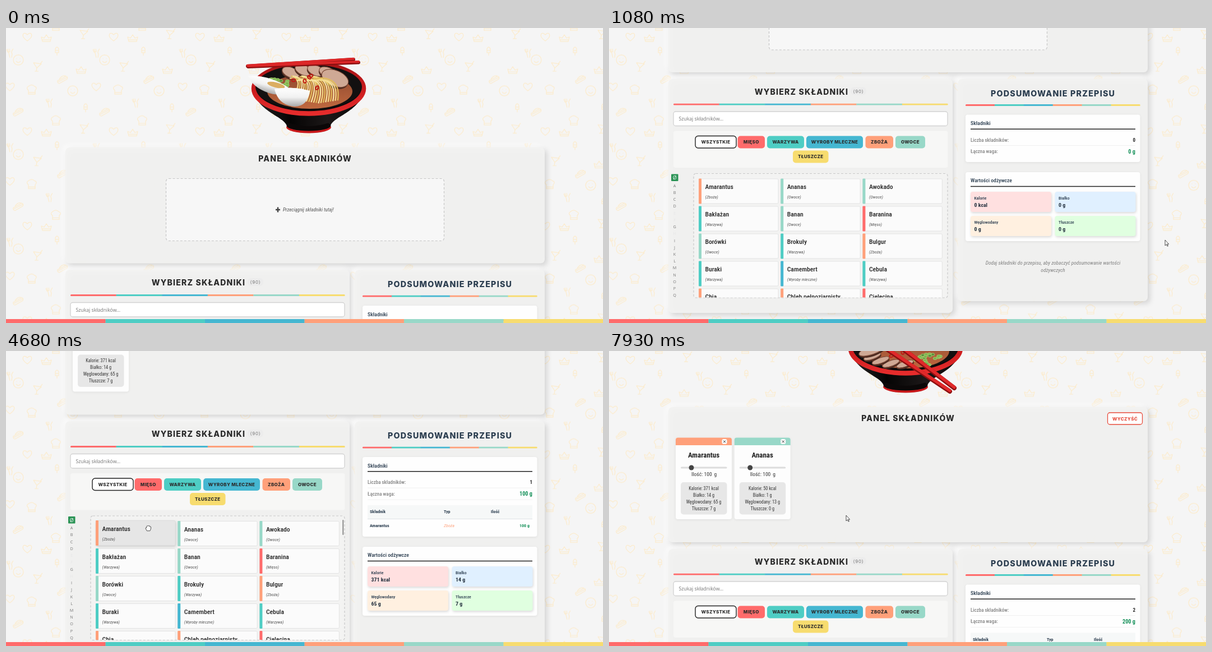
Write an HTML page that moves like this. It is 1065 by 526 pixels and loops after 8 s.

```html
<!DOCTYPE html>
<html lang="pl">
<head>
<meta charset="utf-8">
<title>Panel składników</title>
<style>
  html, body { margin: 0; width: 100%; height: 100%; overflow: hidden; background: #f5f5f5; }
  svg { display: block; width: 100%; height: 100%; --tight: 0; }
  text { font-family: "Roboto Condensed", Roboto, sans-serif; font-stretch: 75%; letter-spacing: var(--tight); white-space: pre; }
  .m { font-weight: 500; }
  .b { font-weight: 700; }
  .i { font-style: italic; }
  .wide, .btn { font-family: Inter, sans-serif; font-stretch: 100%; font-weight: 800; letter-spacing: 1.2px; }
  .btn { letter-spacing: .35px; }
  .count { font-family: Inter, sans-serif; font-stretch: 100%; letter-spacing: .8px; }
  .ui { font-family: "Open Sans", "Noto Sans", sans-serif; font-stretch: 100%; letter-spacing: 0; }
  .panel { filter: drop-shadow(4px 4px 5px #00000026) drop-shadow(-4px -4px 5px #ffffffb0); }
  .card { filter: drop-shadow(0 1px 2px #00000012); }
  .lift { filter: drop-shadow(1px 2px 2px #00000026); }
</style>
</head>
<body>
<svg id="stage" viewBox="0 0 1065 526" preserveAspectRatio="none" xmlns="http://www.w3.org/2000/svg"></svg>
<script>
const W = 1065, H = 526, LOOP = 8000, STEP = 67.6, GROWTH = 34.5, FOLD = 340.5;
const svg = document.getElementById('stage');

const COLOR = {
  'Mięso': '#ff6b6b', 'Warzywa': '#4ecdc4', 'Wyroby mleczne': '#45b7d1',
  'Zboża': '#ffa07a', 'Owoce': '#98d8c8', 'Tłuszcze': '#f7dc6f'
};
const BAND = Object.values(COLOR);
const FOODS = [
  ['Amarantus', 'Zboża'], ['Ananas', 'Owoce'], ['Awokado', 'Owoce'],
  ['Bakłażan', 'Warzywa'], ['Banan', 'Owoce'], ['Baranina', 'Mięso'],
  ['Borówki', 'Owoce'], ['Brokuły', 'Warzywa'], ['Bulgur', 'Zboża'],
  ['Buraki', 'Warzywa'], ['Camembert', 'Wyroby mleczne'], ['Cebula', 'Warzywa'],
  ['Chia', 'Zboża'], ['Chleb pełnoziarnisty', 'Zboża'], ['Cielęcina', 'Mięso']
];
const NUTRIENTS = ['Kalorie', 'Białko', 'Węglowodany', 'Tłuszcze'];
const UNITS = ['kcal', 'g', 'g', 'g'];
const CHOSEN = [
  { name: 'Amarantus', type: 'Zboża', values: [371, 14, 65, 7] },
  { name: 'Ananas', type: 'Owoce', values: [50, 1, 13, 0] }
];

// ---- helpers ----
const clamp = (v, a = 0, b = 1) => Math.min(b, Math.max(a, v));
const ease = u => u * u * (3 - 2 * u);
const ramp = (t, a, b) => ease(clamp((t - a) / (b - a)));
const rect = (x, y, w, h, fill, r = 0, more = '') =>
  `<rect x="${x}" y="${y}" width="${w}" height="${h}" rx="${r}" fill="${fill}" ${more}/>`;
const text = (x, y, str, size, fill, cls = '', anchor = 'start') =>
  `<text x="${x}" y="${y}" font-size="${size}" fill="${fill}" class="${cls}" text-anchor="${anchor}">${str}</text>`;
const oval = (x, y, rx, ry, fill, more = '') =>
  `<ellipse cx="${x}" cy="${y}" rx="${rx}" ry="${ry}" fill="${fill}" ${more}/>`;
const line = (x1, y, x2, color, w) =>
  `<path d="M${x1},${y}H${x2}" stroke="${color}" stroke-width="${w}"/>`;
const stripes = (x, y, w, h, clip = '') => `<g ${clip}>` +
  BAND.map((color, i) => rect(x + i * w / 6, y, w / 6 + .3, h, color)).join('') + '</g>';
const panel = (x, y, w, h) => rect(x, y, w, h, '#f2f2f1', 7, 'fill-opacity=".94" class="panel"');

// ---- wallpaper ----
const ICONS = {
  heart: ['M0,7C-14,-3 -6,-11 0,-4C6,-11 14,-3 0,7Z', [38, 16], [7, 105]],
  smile: ['M-9,0a9,9 0 1 0 18,0a9,9 0 1 0 -18,0M-4,2q4,5 8,0M-3,-3v1M3,-3v1', [22, 57], [119, 112]],
  fork: ['M-5,-8L-3,0L-1,8M-7,-7L-5,-2L-1,-3L-2,-8M5,-8Q0,-2 3,1L2,8', [78, 134], [8, 45]],
  bun: ['M-9,2L6,-6Q10,-5 8,-1L-6,7Q-10,6 -9,2ZM-8,4L8,-4M-6,-1Q0,-9 6,-6', [22, 150], [101, 92]],
  hat: ['M-6,8V1Q-11,-3 -6,-6Q0,-11 5,-6Q11,-4 6,1V8ZM-6,5H6', [46, 110], [89, 165]],
  pot: ['M-7,6L-9,-2L-4,0L0,-6L4,0L9,-2L7,6ZM-7,3H7', [72, 18], [134, 75]],
  glass: ['M-8,-6L6,-4L-2,3ZM-2,3L-3,9M-6,9H1M4,-4L8,-9', [140, 10], [57, 68]],
  bottle: ['M-3,-4V3H3V-4Q0,-10 -3,-4ZM0,3V8M-3,-1H3', [91, 41], [142, 142]]
};
const TILE = [154, 168.5];
const wallpaper = Object.values(ICONS).map(([d, ...spots]) => spots.map(([x, y]) =>
  [0, TILE[0]].map(dx => [0, -TILE[1]].map(dy =>
    `<path d="${d}" transform="translate(${x + dx},${y + dy})"/>`).join('')).join('')).join('')).join('');

// ---- page parts ----
const heading = (x, y, str, fill = '#2b2b2b', size = 14) => text(x + .6, y, str, size, fill, 'wide', 'middle');

function board(n) {
  let out = panel(106, 213, 855, 206.5 + (n ? GROWTH : 0)) + heading(533, 238, 'PANEL SKŁADNIKÓW');
  if (!n) return out +
    rect(285.5, 268.5, 496, 111, '#ffffff80', 5, 'stroke="#c6c6c6" stroke-width="1.2" stroke-dasharray="4 3"') +
    '<path d="M481,324h8M485,319.5v9" stroke="#444" stroke-width="2.4"/>' +
    text(494, 327, 'Przeciągnij składniki tutaj!', 9, '#555', 'i');
  out += rect(889.5, 223, 62, 21, '#fff', 4, 'stroke="#e74c3c" stroke-width="1.3"') +
    text(920.5, 236.5, 'WYCZYŚĆ', 8, '#e74c3c', 'btn', 'middle');
  return out + CHOSEN.slice(0, n).map((c, i) => `<g transform="translate(${119 + i * 104.7},267.5)">` +
    rect(0, 0, 100, 145.5, '#fdfdfd', 4, 'class="card"') +
    `<path d="M0,13.5V4Q0,0 4,0H96Q100,0 100,4V13.5Z" fill="${COLOR[c.type]}"/>` +
    rect(82.5, 2.5, 9, 9, '#fff', 3) +
    '<path d="M85,5l4,4M89,5l-4,4" stroke="#333" stroke-width="1"/>' +
    text(50, 35.5, c.name, 13, '#222', 'b', 'middle') +
    rect(9, 52, 82.5, 3, '#dcdcdc', 1.5) + oval(28, 53.5, 4.5, 4.5, '#444') +
    text(28, 68, 'Ilość:', 9.5, '#333') + text(50.5, 68, '100', 9.5, '#333') + text(68.5, 68, 'g', 9.5, '#333') +
    rect(9, 79.5, 82.5, 57.5, '#e7e7e7', 5) +
    NUTRIENTS.map((label, k) =>
      text(50, 93.3 + k * 11.9, `${label}: ${c.values[k]} ${UNITS[k]}`, 8.2, '#333', '', 'middle')).join('') +
    '</g>').join('');
}

function filters() {
  const row = [['MIĘSO', 229.5, 48.5], ['WARZYWA', 282, 66], ['WYROBY MLECZNE', 352, 101],
    ['ZBOŻA', 457.5, 49.5], ['OWOCE', 511, 53], ['TŁUSZCZE', 328, 63.5]];
  return rect(115, 524, 489.5, 65.5, '#ffffff70', 4) +
    rect(154, 533, 73, 21.5, '#fff', 5, 'stroke="#222" stroke-width="1.4"') +
    text(190.5, 546.8, 'WSZYSTKIE', 8, '#2b2b2b', 'btn', 'middle') +
    row.map(([label, x, w], i) => rect(x, i < 5 ? 533 : 559, w, 22, BAND[i], 5) +
      text(x + w / 2, i < 5 ? 546.8 : 572.8, label, 8, '#2b2b2b', 'btn', 'middle')).join('');
}

function picker(hover, bar) {
  const cards = FOODS.map(([name, type], i) => {
    const on = i === hover;
    return `<g transform="translate(${160 + i % 3 * 146.2},${609.5 + Math.floor(i / 3) * 49 - (on ? 1 : 0)})">` +
      rect(.5, 0, 141.5, 44, on ? '#e6e6e6' : '#fbfbfb', 2,
        `stroke="${on ? '#dcdcdc' : '#e3e3e3'}" stroke-width="1" class="${on ? 'lift' : ''}"`) +
      rect(0, -.5, 5, 45, COLOR[type], 1) +
      text(11.5, 18.3, name, 11.7, '#262626', 'm') +
      text(11.5, 35.3, `(${type})`, 7.8, '#555', 'i') + '</g>';
  }).join('');
  const letters = [...'ABCDEFGHIJKLMNOPQ'].map((ch, i) =>
    text(117, 624.2 + i * 12.23, ch, 7.2, 'EFH'.includes(ch) ? '#e6e6e6' : '#777', 'ui', 'middle')).join('');
  return panel(106, 431.5, 507, 417) +
    heading(343, 459, 'WYBIERZ SKŁADNIKI') +
    rect(431, 446, 28, 14, '#ececec', 6) + text(445, 456.3, '(90)', 8, '#777', 'count', 'middle') +
    stripes(115, 475, 489.5, 3.2, 'clip-path="inset(0 round 1.5px)"') +
    rect(115, 489.5, 489, 25.5, '#fff', 4, 'stroke="#d2d2d2" stroke-width="1.3"') +
    text(124.5, 505.6, 'Szukaj składników...', 8.7, '#757575', 'ui') + filters() +
    rect(151, 600, 453, 221.5, '#ffffff30', 4, 'stroke="#c9c9c9" stroke-width="1.2" stroke-dasharray="4 3"') +
    `<g clip-path="url(#list)">${cards}${letters}</g>` +
    rect(111, 601, 12.5, 12.5, '#2a9355', 1) + text(117.2, 610.7, 'Ø', 9, '#fff', 'ui', 'middle') +
    (bar ? rect(600.5, 607, 1.6, 27, '#777', .8) : '');
}

function summary(n) {
  const items = CHOSEN.slice(0, n);
  const extra = n ? 33.5 + 24 * n : 0;
  const totals = NUTRIENTS.map((_, k) => items.reduce((sum, c) => sum + c.values[k], 0));
  const INK = '#2c3e50', GREEN = '#16915a';
  let out = panel(622.5, 431.5, 338.5, 396 + (n ? 60 : 0)) +
    heading(791.5, 462, 'PODSUMOWANIE PRZEPISU', INK, 14.3) +
    stripes(636, 476.5, 311.5, 3.2, 'clip-path="inset(0 round 1.5px)"') +
    rect(636, 495, 311.5, 84.5 + extra, '#fefefe', 4, 'class="card"') +
    text(645, 513.7, 'Składniki', 9.7, INK, 'm') + line(645, 520.7, 939, '#222', 1.5) +
    text(645, 543, 'Liczba składników:', 9, '#858585', 'm') +
    text(939, 543, n, 9, '#222', 'b', 'end') + line(645, 550, 939, '#f0f0f0', 1) +
    text(645, 563.7, 'Łączna waga:', 9, '#858585', 'm') +
    text(939, 564, `${n * 100} g`, 10.2, GREEN, 'b', 'end');
  if (n) {
    out += line(645, 571, 939, '#f2f2f2', 1) + rect(645, 581, 294, 24.5, '#f6f8f8') +
      [['Składnik', 649], ['Typ', 781], ['Ilość', 865]].map(([s, x]) => text(x, 595.2, s, 8, INK, 'b')).join('') +
      line(645, 605.5, 939, '#dfe3e6', 1);
    items.forEach((c, i) => {
      const y = 619.5 + i * 24;
      out += text(649, y, c.name, 8, INK, 'b') + text(781, y, c.type, 8, COLOR[c.type], 'i') +
        text(934, y, '100 g', 8, GREEN, 'b', 'end') + (i < n - 1 ? line(645, y + 10, 939, '#f0f0f0', 1) : '');
    });
  }
  const y = 597.5 + extra;
  out += rect(636, y, 311.5, 123, '#fefefe', 4, 'class="card"') +
    text(645, y + 18.2, 'Wartości odżywcze', 9.7, INK, 'm') + line(645, y + 25.5, 939, '#222', 1.5);
  ['#ffe0e0', '#e0f0ff', '#fff0e0', '#e0ffe0'].forEach((fill, k) => {
    const x = 645 + k % 2 * 150.5, ty = y + 35 + (k > 1 ? 43 : 0);
    out += rect(x, ty, 144, 36, fill, 4, 'class="lift"') +
      text(x + 6.5, ty + 13.5, NUTRIENTS[k], 7.8, INK, 'm') +
      text(x + 6.5, ty + 27, `${totals[k]} ${UNITS[k]}`, 9.9, '#222f3d', 'b');
  });
  if (!n) out += ['Dodaj składniki do przepisu, aby zobaczyć podsumowanie wartości', 'odżywczych']
    .map((s, i) => text(792, 762 + i * 13.3, s, 9.4, '#808080', 'i', 'middle')).join('');
  return out;
}

// ---- turning bowl ----
function bowl(t) {
  const late = t > 4000, cx = late ? 529 : 540;
  const turn = late ? 2.65 + (t - 7910) * .0006 : t * .00065;
  const c = Math.cos(turn), s = Math.sin(turn);
  const at = (x, z, h = 0) => [cx + x * c + z * s, 112 + .43 * (z * c - x * s) - h].map(v => +v.toFixed(1));
  let out = `<g transform="translate(${cx},0)">
    <path d="M-101,106C-92,150 -46,156 -39,174Q0,188 39,174C46,156 92,150 101,106Z" fill="url(#black)"/>` +
    oval(0, 177, 40, 10.5, '#c9191b') + oval(0, 174, 39.5, 9.5, '#0b0808') +
    '<path d="M-39,168C-44,152 -92,148 -100,108Q0,180 100,108C92,148 44,152 39,168Q0,182 -39,168Z" fill="url(#black)"/>' +
    oval(0, 108, 98, 44.5, '#0d0a0a', 'stroke="url(#red)" stroke-width="8.5"') +
    oval(0, 105, 95, 40, '#131010') + oval(2, 113, 76, 31, 'url(#soup)') + '</g>';

  // slices lean away from the front, so they look thin once turned round
  const lean = .43 + .13 * c;
  [[-32, -62], [-9, -72], [13, -70], [34, -62], [47, -38]].forEach(([x, z], i) => {
    const [px, py] = at(x, z, 6), r = i === 4 ? 25 : 16;
    out += `<g transform="translate(${px},${py}) rotate(${(22 * c).toFixed(1)})">` +
      oval(0, 2.5, r, r * (lean + .04), '#4d2b20') +
      oval(0, 0, r, r * lean, '#cfa995', 'stroke="#7d4c3a" stroke-width="1.2"') + '</g>';
  });
  for (let i = 0; i < 26; i++) {
    const [x, y] = at(-54 + Math.sin(i * 5.1) * 16, -20 + Math.cos(i * 3.7) * 22, 3);
    out += oval(x, y, 3.4, 2.3, i % 3 ? '#7cb54c' : '#5a8f3c', 'stroke="#a9cf72" stroke-width=".9"');
  }
  if (!late) {
    for (let i = 0; i < 20; i++) {
      const a = at(-34 + i * 2.6, -38 - Math.sin(i) * 10, 6);
      const m = at(-6 + i * 3.4, -20, 16), e = at(-30 + i * 4.3, 52 - Math.abs(i - 11) * 1.5);
      out += `<path d="M${a}Q${m} ${e}" fill="none" stroke="${['#f3d986', '#e2bc5c', '#f8e5a4'][i % 3]}" stroke-width="2.3"/>`;
    }
  }
  [[-27, -28], [1, -40], [-7, -24], [15, 4], [4, -46]].forEach(([x, z], i) => {
    const [px, py] = at(x, z, 7);
    out += oval(px, py, 3.4, 2.4, 'none', `stroke="#c01d16" stroke-width="2" transform="rotate(${i * 40} ${px} ${py})"`);
  });
  if (late) {
    const dx = (t - 7910) * .02;
    return out + `<g transform="translate(${dx.toFixed(2)},0)" fill="none" stroke-linecap="round">
      <path d="M478,98L608,185M512,100L616,179" stroke="#8d0f10" stroke-width="8"/>
      <path d="M478,96.5L608,183.5M512,98.5L616,177.5" stroke="#e0292a" stroke-width="5.5"/></g>`;
  }
  const egg1 = at(-73, -16, 6), egg2 = at(-30, 42, 8);
  out += `<g transform="translate(${egg1}) rotate(14)">
    <path d="M-37,-5Q0,-16 37,-2Q30,18 6,16Q-26,13 -37,-5Z" fill="url(#egg)"/>` + oval(15, -1, 16, 4.6 * c, '#dcae62') +
    `</g><g transform="translate(${egg2})">
    <path d="M-31,-13Q0,-19 32,-10Q28,18 5,18Q-24,16 -31,-13Z" fill="url(#egg)"/>
    <path d="M-31,-13Q0,-19 32,-10Q0,-8 -31,-13Z" fill="#fafafa"/></g>`;
  return out + `<g transform="rotate(${(-turn * 20).toFixed(2)} 530 63)" fill="none" stroke-linecap="round">
    <path d="M431,68L620,56M432,69L629,61.5" stroke="#8d0f10" stroke-width="6"/>
    <path d="M431,66.8L620,54.8M432,67.8L629,60" stroke="#dc2728" stroke-width="4"/></g>`;
}

// ---- pointer ----
const PATH = [
  [60, 1008, 505], [640, 992, 378], [1350, 992, 378], [1650, 800, 424], [1900, 642, 300],
  [2160, 780, 176], [2360, 966, 125], [2640, 870, 405], [3000, 580, 400],
  [3740, 251, 303], [4450, 251, 303], [4850, 256, 326], [4930, 256, 326], [5200, 399, 328],
  [5960, 399, 328], [6280, 650, 432], [6560, 928, 390], [6760, 800, 180],
  [7100, 880, 430], [7420, 985, 393], [7540, 985, 393], [7905, 423, 293]
];
function pointer(t) {
  const i = PATH.findIndex(p => p[0] > t);
  if (i === 0) return null;
  if (i < 0) return PATH[PATH.length - 1].slice(1);
  const [a, b] = [PATH[i - 1], PATH[i]], u = ramp(t, a[0], b[0]);
  return [a[1] + (b[1] - a[1]) * u, a[2] + (b[2] - a[2]) * u];
}
const ARROW = 'M0,0V10L2.4,7.8L4,11.2L5.4,10.6L3.9,7.3H6.6Z';
const HAND = 'M-2.5,5L-4.8,.6Q-4.6,-1.4 -3,-.4V-3Q-2,-5 -1,-3.4Q0,-5.6 1,-3.4Q2.6,-5 3,-2.6Q4.8,-3.2 4.8,-.8Q4.8,2 3,5Z';

function cardUnder(x, y) {
  const u = x - 160, v = y - 609.5, col = Math.floor(u / 146.2), row = Math.floor(v / 49);
  const inside = col >= 0 && col < 3 && row >= 0 && row < 5 && y < 821 && u - col * 146.2 < 142 && v - row * 49 < 45;
  return inside ? row * 3 + col : -1;
}

// ---- stage ----
const grad = (id, stops, dir = 'x2="0" y2="1"') => `<linearGradient id="${id}" ${dir}>` +
  stops.map((c, i) => `<stop offset="${i / (stops.length - 1)}" stop-color="${c}"/>`).join('') + '</linearGradient>';
svg.innerHTML = `<defs>
  <pattern id="wall" width="${TILE[0]}" height="${TILE[1]}" patternUnits="userSpaceOnUse">
    <g fill="none" stroke="#fcebcb" stroke-width="1.2" stroke-linejoin="round">${wallpaper}</g></pattern>
  <clipPath id="list"><rect x="106" y="601" width="498" height="220"/></clipPath>
  ${grad('black', ['#2a2626', '#050404', '#1c1818', '#060505'], '')}
  ${grad('red', ['#a51517', '#c91b1d', '#e62c2c'])}
  ${grad('soup', ['#8f4a30', '#c0683f'])}
  ${grad('egg', ['#ffffff', '#f1f1f1', '#a9a9a9'])}</defs>` +
  rect(0, 0, W, H, '#f5f5f5') + rect(0, 0, W, H, 'url(#wall)') +
  '<g id="page"><g id="bowl"></g><g id="board"></g><g id="lower"></g></g>' +
  stripes(0, 519, W, 7) +
  '<path id="cursor" stroke="#222" stroke-width=".8" fill="#fff" stroke-linejoin="round"/><text id="probe" visibility="hidden" font-size="40">Składniki</text>';
const [page, bowlG, boardG, lower, cursor, probe] =
  ['page', 'bowl', 'board', 'lower', 'cursor', 'probe'].map(id => document.getElementById(id));

// tighter tracking when no condensed face is available
const narrow = probe.getComputedTextLength();
probe.style.cssText = 'font-family:Roboto,sans-serif;font-stretch:100%';
if (narrow > probe.getComputedTextLength() * .96) svg.style.setProperty('--tight', '-.06em');
probe.remove();

let shown = '';
function draw(t) {
  const n = t < 4420 ? 0 : t < 5740 ? 1 : 2;
  const scroll = FOLD * (ramp(t, 645, 1075) - ramp(t, 7464, 8189));
  const shift = n ? GROWTH : 0;
  const pos = pointer(t);
  const hover = pos ? cardUnder(pos[0], pos[1] + scroll - shift) : -1;
  const bar = t > 3060;
  const key = [n, hover, bar].join();
  if (key !== shown) {
    shown = key;
    boardG.innerHTML = board(n);
    lower.innerHTML = picker(hover, bar) + summary(n);
    lower.setAttribute('transform', `translate(0,${shift})`);
  }
  page.setAttribute('transform', `translate(0,${(-scroll).toFixed(2)})`);
  bowlG.innerHTML = scroll < 195 ? bowl(t) : '';
  cursor.style.display = pos ? '' : 'none';
  if (pos) {
    const grab = (t >= 4140 && t < 4420) || (t >= 5470 && t < 5740);
    cursor.setAttribute('d', hover < 0 ? ARROW : HAND);
    cursor.setAttribute('transform', `translate(${pos[0].toFixed(1)},${pos[1].toFixed(1)}) scale(${grab ? .85 : 1})`);
  }
}

// the picture advances about fifteen times a second
const start = performance.now();
function tick() {
  const t = (performance.now() - start) % LOOP;
  draw(Math.floor(t / STEP + .15) * STEP);
  requestAnimationFrame(tick);
}
tick();
</script>
</body>
</html>
```
